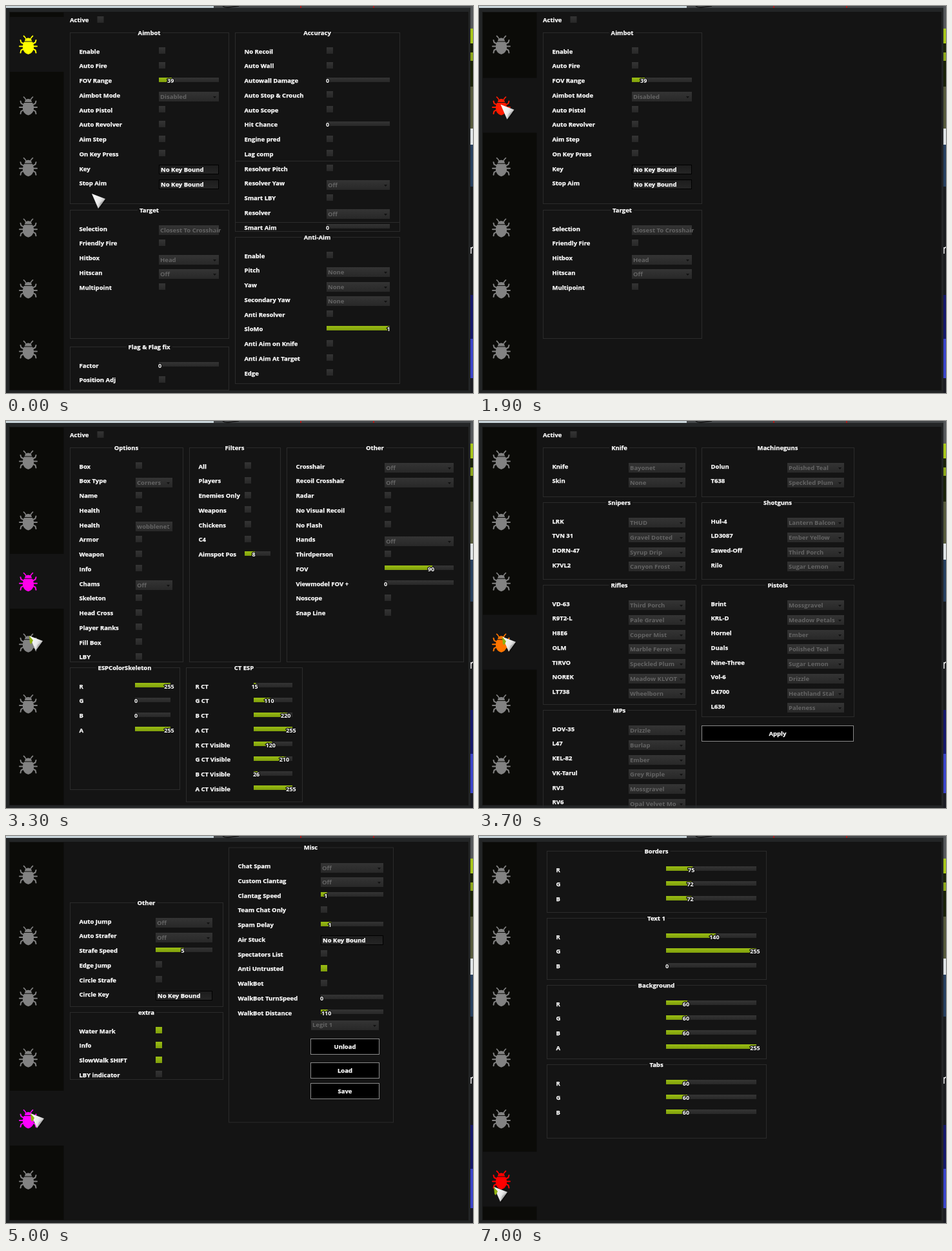
An HTML page for the animation above (7100 ms loop, 724 by 600 pixels).

```html
<!DOCTYPE html>
<html lang="en">
<head>
<meta charset="utf-8">
<title>Menu tour</title>
<style>
  html, body { margin: 0; width: 100%; height: 100%; overflow: hidden; background: #141414; }
  svg { display: block; }
  text { font: 700 9.5px "Open Sans", "Noto Sans", sans-serif; fill: #fff; stroke: #fff; stroke-width: .25px; white-space: pre; }
  .dim { fill: #646464; stroke: none; }
  .mid { text-anchor: middle; }
  .num { font-size: 9px; text-anchor: middle; stroke: #141414; stroke-width: 2.5px; paint-order: stroke; }
  .box { fill: none; stroke: #2b2b2b; }
</style>
</head>
<body>
<svg id="stage" width="724" height="600" viewBox="0 0 724 600">
  <defs>
    <linearGradient id="off" x2="0" y2="1"><stop stop-color="#343434"/><stop offset="1" stop-color="#282828"/></linearGradient>
    <linearGradient id="on" x2="0" y2="1"><stop stop-color="#9abd14"/><stop offset="1" stop-color="#7f9e0c"/></linearGradient>
    <linearGradient id="dark" x2="0" y2="1"><stop stop-color="#1c1c1c"/><stop offset="1" stop-color="#262626"/></linearGradient>
    <linearGradient id="silver" x2="1" y2=".6"><stop stop-color="#fff"/><stop offset=".6" stop-color="#ececec"/><stop offset="1" stop-color="#b4b4b4"/></linearGradient>
    <g id="bug" stroke="currentColor" stroke-width="2" fill="none" stroke-linecap="round" stroke-linejoin="round">
      <path d="M-3.500-9Q-4-11.500-7-14M3.500-9Q4-11.500 7-14" stroke-width="1.700"/>
      <path d="M-7-2L-11-4-12-7.500M7-2L11-4 12-7.500M-8 2H-13.500M8 2H13.500M-7 6L-11 8-12 12M7 6L11 8 12 12"/>
      <path d="M-5.500-6A5.500 5 0 0 1 5.500-6Z" fill="currentColor" stroke="none"/>
      <path d="M-6.500-5H6.500Q9-1 8.500 5Q7 13 0 14.500Q-7 13-8.500 5Q-9-1-6.500-5Z" fill="currentColor" stroke="none"/>
    </g>
  </defs>
</svg>
<script>
const LOOP = 7100, STEP = 100, PITCH = 22.75;
const stage = document.getElementById("stage");

function add(parent, tag, attrs = {}, text) {
  const el = document.createElementNS("http://www.w3.org/2000/svg", tag);
  for (const k in attrs) el.setAttribute(k, attrs[k]);
  if (text !== undefined) el.textContent = text;
  parent.appendChild(el);
  return el;
}
const rect = (p, x, y, width, height, fill, more) => add(p, "rect", { x, y, width, height, fill, ...more });
const label = (p, x, cy, s, cls = "") => add(p, "text", { x, y: Math.round(cy + 3.4), class: cls }, s);

function checkbox(p, x, cy, on) {
  rect(p, x, Math.round(cy - 6), 10, 10, on ? "url(#on)" : "url(#off)");
}
function slider(p, x, cy, w, value, max) {
  const end = w * value / max, y = Math.round(cy - 5);
  rect(p, x, y, w, 7, "url(#off)");
  rect(p, x, y, end, 7, "url(#on)");
  label(p, x + end + (+value ? -2 : 1.5), cy, value, "num");
}
function combo(p, x, cy, w, value) {
  const y = Math.round(cy - 5);
  rect(p, x, y, w, 15, "url(#off)");
  add(p, "path", { d: `M${x + w - 9} ${y + 7}h5l-2.500 3z`, fill: "#111" });
  label(p, x + 2, cy + 2.5, value, "dim");
}
function keybox(p, x, cy, w) {
  rect(p, x + .5, Math.round(cy - 6) + .5, w - 1, 14, "url(#dark)", { stroke: "#000" });
  label(p, x + 3, cy + 1.2, "No Key Bound");
}
function button(p, x, y, w, h, s) {
  rect(p, x + .5, y + .5, w - 1, h - 1, "#000", { stroke: "#8a8a8a" });
  label(p, x + w / 2, y + h / 2, s, "mid");
}

// Rows: "Name" checkbox, "Name*" ticked, "Name=" key, "Name:v" list, "Name~v/max" slider
function row(p, x, cx, cw, cy, spec) {
  const [, name, kind, value] = spec.match(/^([^*=:~]+)([*=:~]?)(.*)$/);
  label(p, x, cy, name);
  if (kind === "=") keybox(p, cx, cy, cw);
  else if (kind === ":") combo(p, cx, cy, cw, value);
  else if (kind === "~") slider(p, cx, cy, cw, ...value.split("/"));
  else checkbox(p, cx, cy, kind === "*");
}
function group(p, [title, x, y, w, h, cx, cw, rows]) {
  rect(p, x + .5, y - .5, w, h, "none", { class: "box" });
  const name = label(p, x + w / 2, y - .5, title, "mid");
  const gap = name.getComputedTextLength() / 2 + 3;
  p.insertBefore(rect(p, x + w / 2 - gap, y - 2, gap * 2, 3, "#141414"), name);
  rows.split("|").forEach((r, i) => row(p, x + 14.5, cx, cw, y + 28.2 + i * PITCH, r));
}

const aim = ["Aimbot", 99, 42, 246, 265, 237, 93,
  "Enable|Auto Fire|FOV Range~39/180|Aimbot Mode:Disabled|Auto Pistol|Auto Revolver|Aim Step|On Key Press|Key=|Stop Aim="];
const target = ["Target", 99, 317, 246, 199, 237, 93,
  "Selection:Closest To Crosshair|Friendly Fire|Hitbox:Head|Hitscan:Off|Multipoint"];

const pages = [
  { active: true, groups: [aim, target,
    ["Flag & Flag fix", 99, 529, 246, 67, 237, 93, "Factor~0/1|Position Adj"],
    ["Accuracy", 355, 42, 255, 308, 497, 98,
      "No Recoil|Auto Wall|Autowall Damage~0/1|Auto Stop & Crouch|Auto Scope|Hit Chance~0/1|Engine pred|Lag comp|Resolver Pitch|Resolver Yaw:Off|Smart LBY|Resolver:Off|Smart Aim~0/1"],
    ["Anti-Aim", 355, 359, 255, 227, 497, 98,
      "Enable|Pitch:None|Yaw:None|Secondary Yaw:None|Anti Resolver|SloMo~1/1|Anti Aim on Knife|Anti Aim At Target|Edge"]],
    extra: p => add(p, "path", { d: "M355 240.500H610M355 335.500H610", class: "box" }) },
  { active: true, groups: [aim, target] },
  { active: true, groups: [
    ["Options", 99, 42, 175, 332, 201, 57,
      "Box|Box Type:Corners|Name|Health|Health:wobblenet|Armor|Weapon|Info|Chams:Off|Skeleton|Head Cross|Player Ranks|Fill Box|LBY"],
    ["Filters", 284, 42, 141, 332, 370, 40,
      "All|Players|Enemies Only|Weapons|Chickens|C4|Aimspot Pos~8/20"],
    ["Other", 435, 42, 274, 332, 587, 107,
      "Crosshair:Off|Recoil Crosshair:Off|Radar|No Visual Recoil|No Flash|Hands:Off|Thirdperson|FOV~90/130|Viewmodel FOV +~0/1|Noscope|Snap Line"],
    ["ESPColorSkeleton", 99, 383, 170, 189, 200, 55,
      "R~255/255|G~0/255|B~0/255|A~255/255"],
    ["CT ESP", 279, 383, 180, 208, 384, 60,
      "R CT~15/255|G CT~110/255|B CT~220/255|A CT~255/255|R CT Visible~120/255|G CT Visible~210/255|B CT Visible~26/255|A CT Visible~255/255"]] },
  { active: true, groups: [
    ["Knife", 99, 42, 237, 76, 232, 88, "Knife:Bayonet|Skin:None"],
    ["Snipers", 99, 127, 237, 119, 232, 88,
      "LRK:THUD|TVN 31:Gravel Dotted|DORN-47:Syrup Drip|K7VL2:Canyon Frost"],
    ["Rifles", 99, 255, 237, 185, 232, 88,
      "VD-63:Third Porch|R9T2-L:Pale Gravel|H8E6:Copper Mist|OLM:Marble Ferret|TIRVO:Speckled Plum|NOREK:Meadow KLVOT|LT738:Wheelborn"],
    ["MPs", 99, 449, 237, 170, 232, 88,
      "DOV-35:Drizzle|L47:Burlap|KEL-82:Ember|VK-Tarul:Grey Ripple|RV3:Mossgravel|RV6:Opal Velvet Mo"],
    ["Machineguns", 345, 42, 236, 76, 478, 88, "Dolun:Polished Teal|T638:Speckled Plum"],
    ["Shotguns", 345, 127, 236, 119, 478, 88,
      "Hul-4:Lantern Balcon|LD3087:Ember Yellow|Sawed-Off:Third Porch|Rilo:Sugar Lemon"],
    ["Pistols", 345, 255, 236, 204, 478, 88,
      "Brint:Mossgravel|KRL-D:Meadow Petals|Hornel:Ember|Duals:Polished Teal|Nine-Three:Sugar Lemon|Vol-6:Drizzle|D4700:Heathland Stal|L630:Paleness"]],
    extra: p => button(p, 345, 472, 236, 25, "Apply") },
  { groups: [
    ["Other", 99, 104, 237, 161, 232, 88,
      "Auto Jump:Off|Auto Strafer:Off|Strafe Speed~5/10|Edge Jump|Circle Strafe|Circle Key="],
    ["extra", 99, 274, 237, 104, 232, 88, "Water Mark*|Info*|SlowWalk SHIFT*|LBY indicator"],
    ["Misc", 345, 18.5, 255, 426, 488, 97,
      "Chat Spam:Off|Custom Clantag:Off|Clantag Speed~1/10|Team Chat Only|Spam Delay~1/6|Air Stuck=|Spectators List|Anti Untrusted*|WalkBot|WalkBot TurnSpeed~0/1|WalkBot Distance~110/1000"]],
    extra: p => {
      combo(p, 473, 290.5, 105, "Legit 1");
      button(p, 472, 314, 107, 25, "Unload");
      button(p, 472, 351, 107, 25, "Load");
      button(p, 472, 383, 107, 25, "Save");
    } },
  { groups: [
    ["Borders", 105, 24, 340, 95, 290, 140, "R~75/255|G~72/255|B~72/255"],
    ["Text 1", 105, 128, 340, 95, 290, 140, "R~140/255|G~255/255|B~0/255"],
    ["Background", 105, 232, 340, 114, 290, 140, "R~60/255|G~60/255|B~60/255|A~255/255"],
    ["Tabs", 105, 355, 340, 114, 290, 140, "R~60/255|G~60/255|B~60/255"]] },
];

// Backdrop showing around the window
rect(stage, 0, 0, 724, 600, "#232526");
rect(stage, 0, 0, 322, 3, "#c9d5da");
rect(stage, 322, 0, 402, 3, "#45484a");
add(stage, "path", { d: "M336 0q3 3 10 2t15-2", stroke: "#111", fill: "none", "stroke-width": 1.5 });
for (const x of [456, 569]) rect(stage, x, 0, 2, 3, "#b01818");
[[0, 35, "#55585a"], [35, 23, "#a5c41a"], [58, 14, "#1a2208"], [72, 13, "#8aa51a"], [85, 40, "#1a2208"],
 [125, 65, "#565a3c"], [190, 25, "#dde2e4"], [215, 65, "#27405e"], [280, 168, "#191b1d"], [448, 68, "#15186a"],
 [516, 61, "#3a44c8"], [577, 23, "#1b1c22"]].forEach(([y, h, c]) => rect(stage, 720, y, 4, h, c));
add(stage, "path", { d: "M721 384v-10m0 3q1-3 3-3", stroke: "#eee", fill: "none", "stroke-width": 1.5 });

rect(stage, 5, 9, 712, 587, "#141414");
rect(stage, 6, 10, 83.5, 585, "#0b0b08");

const lit = rect(stage, 6, 0, 84, 85, "#141414");
const bugs = pages.map((_, i) => add(stage, "use", { href: "#bug", x: 34.5, y: 60.5 + i * 94.6 }));

const layers = pages.map(({ active, groups, extra }) => {
  const g = add(stage, "g");
  if (active) {
    label(g, 99, 22, "Active");
    checkbox(g, 141.5, 21.5);
  }
  groups.forEach(d => group(g, d));
  if (extra) extra(g);
  return g;
});

const cursor = add(stage, "g");
add(cursor, "path", { d: "M1 1L22 10L11 25Z", fill: "#000", opacity: .4 });
add(cursor, "path", { d: "M0 0L21 8L10 23Z", fill: "url(#silver)" });
add(cursor, "path", { d: "M10 23L21 8L13 14Z", fill: "#9c9c9c", opacity: .6 });
const edge = add(cursor, "path", { d: "M0 0L6 7L3 13L1 11Z", fill: "#8fb012" });
const arrow = add(cursor, "path", {
  d: "M.5 0V16L4.500 12.500L7 18.500L10 17L7.500 11.500H12.500Z", fill: "#fff", stroke: "#111" });

const clicks = [0, 1400, 2300, 3500, 4700, 6000];
const path = [[0, 133, 291], [200, 133, 291], [1100, 33, 140], [1800, 33, 142], [2300, 38, 245], [2800, 38, 245],
  [3200, 36, 333], [3900, 36, 335], [4300, 38, 429], [5100, 38, 430], [5700, 27, 538], [7000, 23, 544], [7100, 23, 544]];
const hues = [[0, 60], [1200, 228], [2500, 485], [3300, 665], [4400, 892], [5800, 1190], [7000, 1440], [7100, 1460]];

function sample(keys, t, ease = u => u) {
  const i = keys.findIndex((k, n) => n && t <= k[0]);
  const [t0, ...a] = keys[i - 1], [t1, ...b] = keys[i];
  const u = ease((t - t0) / (t1 - t0));
  return a.map((v, n) => v + (b[n] - v) * u);
}
const smooth = u => u * u * (3 - 2 * u);

function draw(t) {
  const tab = clicks.filter(c => c <= t).length - 1;
  const hue = sample(hues, t)[0] % 360;
  const [x, y] = sample(path, t, smooth);
  lit.setAttribute("y", 17 + tab * 94.5);
  layers.forEach((g, i) => g.style.display = i === tab ? "" : "none");
  bugs.forEach((b, i) => b.style.color = i === tab ? `hsl(${hue}, 100%, 50%)` : "#828282");
  cursor.setAttribute("transform", `translate(${x} ${y})`);
  edge.style.display = t >= 2300 ? "" : "none";
  arrow.style.display = t >= 1100 && t < 1400 ? "" : "none";
}

const start = performance.now();
function tick() {
  const t = (performance.now() - start) % LOOP;
  draw(Math.floor(t / STEP) * STEP);
  requestAnimationFrame(tick);
}
tick();
</script>
</body>
</html>
```
